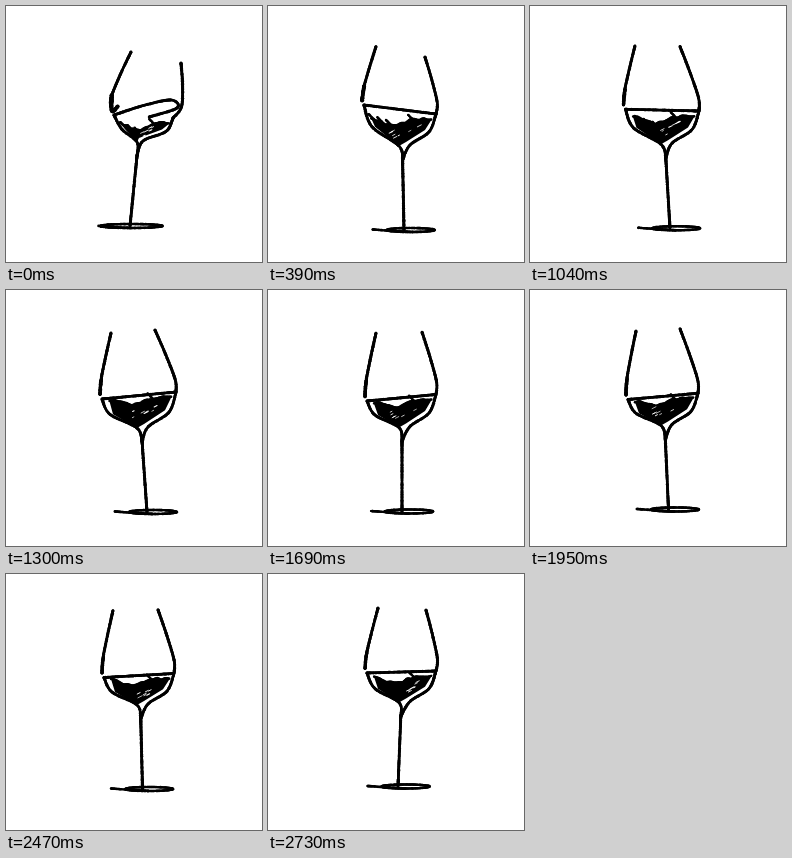
Write an HTML page with a canvas that moves like this. It is 256 by 256 pixels and loops after 2.86 s.

```html
<!DOCTYPE html>
<html lang="en">
<head>
<meta charset="utf-8">
<title>Swirling wine glass</title>
<style>
html, body { margin: 0; width: 100%; height: 100%; overflow: hidden; background: #fff; }
canvas { display: block; width: 100vw; height: 100vh; }
</style>
</head>
<body>
<canvas id="stage"></canvas>
<script>
const SIZE = 256, STEP = 130, COUNT = 22;
const BOWL_X = 131, REST_X = 134, STEM_H = 84, FOOT_R = 31;
const canvas = document.getElementById('stage');
const ctx = canvas.getContext('2d');
const scale = window.devicePixelRatio || 1;
canvas.width = canvas.height = SIZE * scale;
ctx.scale(scale, scale);

// Key poses: drawing number, then left lip, right lip, wine left, wine right, foot
const poses = [
  [0, [125, 46], [175, 57], [108, 109], [167, 112], [124, 220]],
  [3, [108, 40.5], [157, 51], [96, 99], [168, 108], [136, 224]],
  [6, [105, 36.5], [151, 41], [95, 97.5], [168, 108], [139, 222.5]],
  [10, [105, 43], [149, 40], [96, 109], [170, 102], [141, 222]],
  [13, [108, 43], [154, 42], [99, 111], [168, 104.5], [134, 221.5]],
  [17, [104, 39], [146, 35.5], [97, 108], [168, 102], [143, 217.5]],
  [21, [110, 34], [158, 36], [99, 99], [168, 97], [130, 212.5]]
];

const mix = (a, b, k) => a + (b - a) * k;
const between = (p, q, k) => [mix(p[0], q[0], k), mix(p[1], q[1], k)];
const shift = (p, dx, dy, k = 1) => [p[0] + dx * k, p[1] + dy * k];

function poseAt(frame) {
  const i = Math.min(poses.findLastIndex(p => p[0] <= frame), poses.length - 2);
  const [from, ...a] = poses[i], [to, ...b] = poses[i + 1];
  return a.map((p, j) => between(p, b[j], (frame - from) / (to - from)));
}

// Small seeded generator, restarted for every drawing
let seed = 1;
function rnd() {
  seed = (seed * 16807) % 2147483647;
  return seed / 2147483647;
}

function spline(a, b, c, d, t) {
  return 0.5 * (2 * b + (c - a) * t + (2 * a - 5 * b + 4 * c - d) * t * t
    + (3 * b - a - 3 * c + d) * t * t * t);
}

// Rough felt-pen stroke through the points
function pen(points, r = 1.45) {
  const last = points.length - 1;
  for (let i = 0; i < last; i++) {
    const a = points[Math.max(i - 1, 0)], b = points[i];
    const c = points[i + 1], d = points[Math.min(i + 2, last)];
    const n = Math.ceil(Math.hypot(c[0] - b[0], c[1] - b[1]) / 0.7);
    for (let j = 0; j < n; j++) {
      const [x, y] = [0, 1].map(k => spline(a[k], b[k], c[k], d[k], j / n));
      ctx.beginPath();
      ctx.arc(x, y, r * (0.88 + rnd() * 0.24), 0, Math.PI * 2);
      ctx.fill();
    }
  }
}

// Side of the glass from lip to wine, swelling outwards
const side = (lip, end, bulge) => [
  lip,
  shift(between(lip, end, 0.4), bulge * 0.7, 0),
  shift(between(lip, end, 0.8), bulge, 0),
  end
];

function wine(left, right, wallL, wallR) {
  const slope = (right[1] - left[1]) / 10;
  const surface = u => {
    const dip = 5 + 7 * Math.exp(-(((u - 0.4) / 0.2) ** 2)) + 9 * slope * (1 - u);
    return shift(between(left, right, u), 0, Math.max(2.5, dip));
  };
  const edge = [];
  for (let u = 0.1; u < 0.95; u += 0.06) edge.push(shift(surface(u), 0, rnd() * 2 - 1));

  const shape = [...edge, shift(wallR[1], -4, -2), shift(wallR[2], -4, -3),
    wallL[2], shift(wallL[1], 3, 0)];
  ctx.beginPath();
  shape.forEach(p => ctx.lineTo(...p));
  ctx.fill();
  pen(edge, 1.1);

  // Pen flicks above the wine: one splash, more on the left when it leans
  const flick = (u, size) => {
    const p = surface(u);
    pen([shift(p, -6, -6, size), shift(p, 2, 2)], 1.2);
  };
  flick(0.68, 0.8);
  for (let i = 0; i < 3 && slope > 0; i++) flick(0.14 + i * 0.12, slope);

  // Bare paper between the scribbles
  ctx.strokeStyle = '#fff';
  ctx.lineCap = 'round';
  for (let i = 0; i < 7; i++) {
    const p = between(surface(0.2 + rnd() * 0.65), wallL[2], 0.2 + rnd() * 0.5);
    ctx.lineWidth = 0.6 + rnd() * 0.5;
    ctx.beginPath();
    ctx.moveTo(...p);
    ctx.lineTo(...shift(p, 3, -1.5, 0.4 + rnd()));
    ctx.stroke();
  }
}

function foot(x, y, loop) {
  const rx = mix(24, FOOT_R, loop), cx = x + FOOT_R - rx;
  const ring = [];
  for (let i = 0; i <= 24; i++) {
    const a = Math.PI * (1 + i / 12);
    ring.push([cx + rx * Math.cos(a), y + 2 * Math.sin(a)]);
  }
  pen(ring, 1.25);
  pen([[x - FOOT_R, y - 0.5], [cx - rx, y + 0.5], [cx, y + 2]], 1.25);
}

function draw(frame) {
  const [lipL, lipR, left, right, base] = poseAt(frame);
  const loop = Math.max(0, 1 - frame / 3);
  const calm = Math.min(1, frame / 12);
  const bowlY = base[1] - STEM_H;
  seed = 911 + frame * 7919;
  ctx.fillStyle = '#fff';
  ctx.fillRect(0, 0, SIZE, SIZE);
  ctx.fillStyle = '#000';

  const lean = base[0] - REST_X;
  const bottomL = [BOWL_X, bowlY], bottomR = [mix(142, 137, loop), bowlY - 1];
  const wallL = [left, shift(between(left, [left[0], bowlY], 0.53), 8, 0), bottomL];
  const wallR = [right, shift(between(right, [right[0], bowlY], 0.56), -7, 0), bottomR];
  const neck = [REST_X + lean * 0.3, bowlY + 14];
  wine(left, right, wallL, wallR);
  pen([...wallL, neck]);
  pen([...wallR, neck]);
  pen([neck, base]);
  foot(REST_X + lean * 0.85, base[1], loop);

  const sideL = side(lipL, shift(left, -2, -4), -1.7 * (1 + 2 * loop));
  const end = sideL[3];
  pen(sideL);
  pen([shift(sideL[2], 1, -4), end, shift(end, 6, -5, loop)], mix(2, 1.4, calm));
  pen(side(lipR, right, 3.4 * (1 + loop)));

  // Surface line, curling over into a wave while the wine is thrown up
  pen([
    left,
    shift(between(left, right, 0.5), 0, -11, loop),
    shift(right, -2, -18, loop),
    shift(right, 4, -10, loop),
    shift(right, -24, -1, loop)
  ]);
}

const start = performance.now();
let shown = -1;
function tick() {
  const frame = Math.floor((performance.now() - start) / STEP) % COUNT;
  if (frame !== shown) draw(shown = frame);
  requestAnimationFrame(tick);
}
tick();
</script>
</body>
</html>
```
